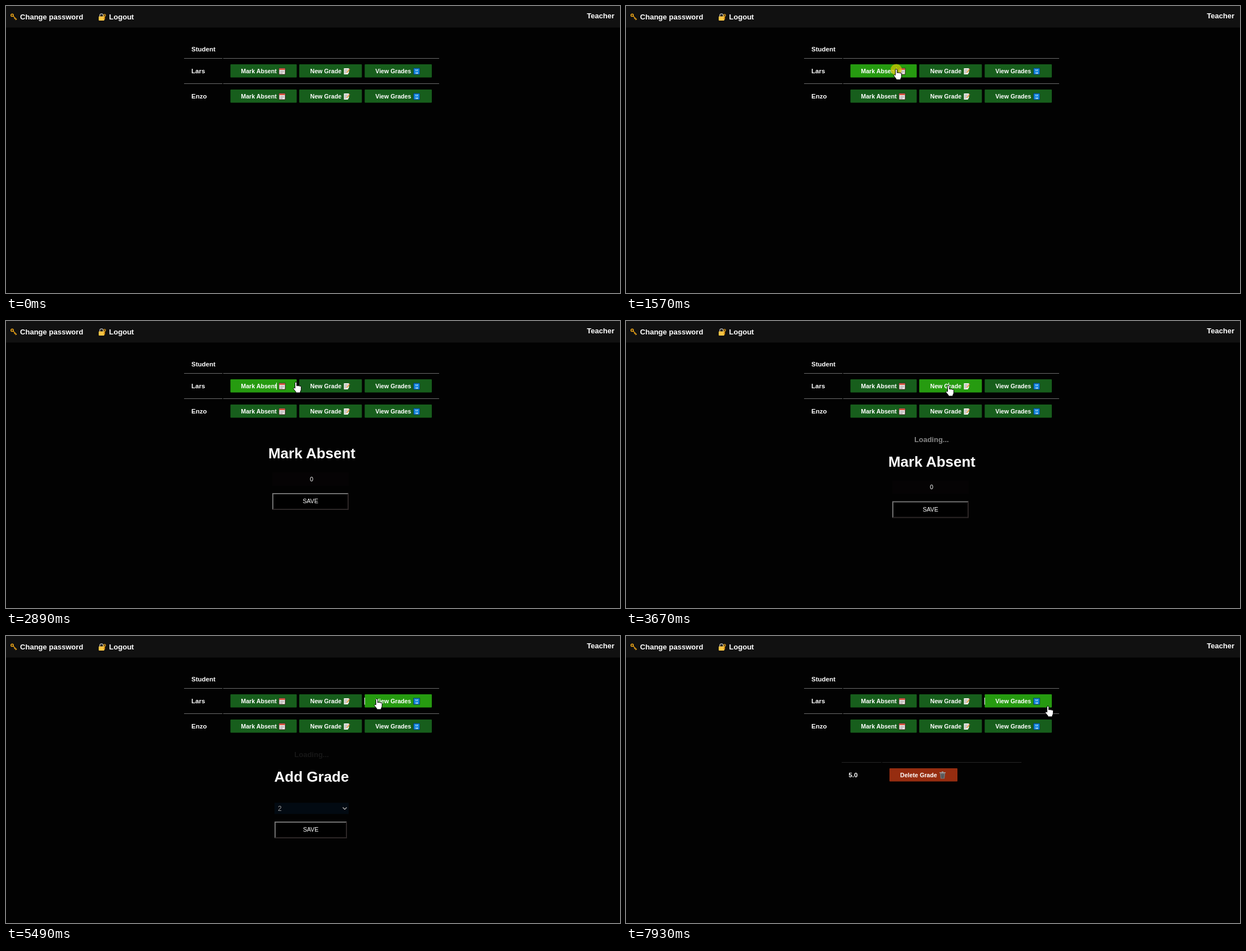
Recreate the animation shown at these times as an HTML page. Size 1093 px wide and 512 px high, loop 8000 ms.

```html
<!DOCTYPE html>
<html lang="en">
<head>
<meta charset="utf-8">
<title>Class register</title>
<style>
html, body { margin: 0; width: 100%; height: 100%; overflow: hidden; background: #020202; }
svg { display: block; }
text { font-family: "Liberation Sans", Arial, sans-serif; font-weight: 700; fill: #fff; }
.plain { font-weight: 400; }
.mid { text-anchor: middle; }
.btn { fill: #175e1c; }
.btn.hover { fill: #269b10; }
</style>
</head>
<body>
<svg id="stage" width="1093" height="512" viewBox="0 0 1093 512">
  <defs>
    <g id="key" fill="none" stroke="#e5a018">
      <circle cx="3" cy="3.4" r="2.1" stroke-width="1.7"/>
      <path d="M4.8 5 11 11.2M8 8.4 6.6 10M10 10.4 8.7 11.8" stroke-width="1.5"/>
    </g>
    <g id="lock">
      <path d="M2 7V4a3 3 0 0 1 6 0V7" fill="none" stroke="#a9a9a9" stroke-width="1.5"/>
      <rect y="5.5" width="10" height="7.5" rx="1" fill="#fbc543"/>
      <path d="M10.5 5V11M10.5 9h-2" stroke="#d58a12" stroke-width="1.4"/>
      <circle cx="10.5" cy="3.5" r="1.7" fill="none" stroke="#e5a018" stroke-width="1.3"/>
    </g>
    <g id="calendar">
      <rect x=".5" y=".5" width="11" height="11" fill="#f4f0ee" stroke="#3a2320"/>
      <path d="M1 2.2H11" stroke="#d8402c" stroke-width="2.4"/>
      <path d="M2.5 5.5H9.5M2.5 7.5H9.5M2.5 9.5H7" stroke="#9a9a9a"/>
    </g>
    <g id="memo">
      <path d="M1 .5H10V8L8 11.5H1z" fill="#f3f1ec"/>
      <path d="M2.5 3H8M2.5 5H7M2.5 7H6M2.5 9H5" stroke="#8d8d8d" stroke-width=".8"/>
      <path d="M11 2.5 6 8.5" stroke="#e39a38" stroke-width="1.7"/>
      <path d="M11.5 1.9 10.6 3" stroke="#d9485a" stroke-width="1.7"/>
    </g>
    <g id="digits">
      <rect x=".5" y=".5" width="11" height="11" fill="#0f83dc" stroke="#0a3a66"/>
      <text x="6" y="5.4" font-size="4.4" class="mid">12</text>
      <text x="6" y="10" font-size="4.4" class="mid">34</text>
    </g>
    <g id="bin">
      <path d="M1.5 3H10.5L9.5 13h-7z" fill="#77797b"/>
      <path d="M4 4.5 4.4 12M6 4.5V12M8 4.5 7.6 12" stroke="#3b3d3f" stroke-width=".9"/>
      <path d="M.5 2.3H11.5M4.5 1H7.5" stroke="#a0a2a4" stroke-width="1.4"/>
    </g>
  </defs>
</svg>
<script>
const LOOP = 8000, BLINK = 530, STEP = 77, PUSH = 14.5;
const stage = document.getElementById('stage');

const text = (x, y, size, str, cls = '', more = '') =>
  `<text x="${x}" y="${y}" font-size="${size}" class="${cls}" ${more}>${str}</text>`;
const rect = (x, y, w, h, fill) => `<rect x="${x}" y="${y}" width="${w}" height="${h}" fill="${fill}"/>`;
const icon = (name, x, y) => `<use href="#${name}" x="${x}" y="${y}"/>`;
const rule = (y, x1, x2, x3, color) => rect(x1, y, x2 - x1, 1, color) + rect(x2 + 1.5, y, x3 - x2 - 1.5, 1, color);

// Column: left edge, width, label, label x, icon, icon x
const columns = [
  [399.5, 118, 'Mark Absent', 418.3, 'calendar', 485.5],
  [522, 111.5, 'New Grade', 541.5, 'memo', 600.5],
  [638.5, 119.5, 'View Grades', 657.5, 'digits', 725]
];
const row = (name, y) => text(330, y + 15.5, 11.5, name) + columns.map(([x, w, label, tx, pic, px]) =>
  `<rect class="btn" x="${x}" y="${y}" width="${w}" height="23.5" rx="1"/>` +
  text(tx, y + 16, 10.65, label) + icon(pic, px, y + 6.5)).join('');

const saveButton = (x, y, w) => {
  const h = 30;
  return rect(x, y, w, h, '#000') +
    `<path d="M${x} ${y + h}V${y}H${x + w}l-2 2H${x + 2}V${y + h - 2}z" fill="#727272"/>` +
    `<path d="M${x} ${y + h}H${x + w}V${y}l-2 2V${y + h - 2}H${x + 2}z" fill="#2d2727"/>` +
    text(x + w / 2, y + 18.3, 10.7, 'SAVE', 'plain mid');
};
const view = (id, body) => `<g id="${id}">${body}</g>`;

stage.insertAdjacentHTML('beforeend',
  rect(0, 0, 1093, 38.5, '#111') +
  icon('key', 8, 13) + text(25, 24, 13.05, 'Change password') +
  icon('lock', 165, 13) + text(183.5, 24, 13.05, 'Logout') +
  text(1083, 21.7, 13, 'Teacher', '', 'text-anchor="end"') +
  text(330, 80.5, 11.5, 'Student') +
  rule(93, 317, 385, 771, '#6c6c6c') + row('Lars', 104) +
  rule(138, 317, 385, 771, '#6c6c6c') + row('Enzo', 149) +
  text(544, 216, 13, 'Loading...', 'mid', 'id="loading"') +
  view('absent',
    text(544.5, 245, 26, 'Mark Absent', 'mid') +
    rect(474, 270, 136, 24, '#050304') + text(544, 285.5, 10.7, '0', 'plain mid') +
    saveButton(474, 307, 136)) +
  view('add',
    text(544, 245, 26, 'Add Grade', 'mid') +
    rect(478, 283, 132, 20, '#020a12') +
    text(484, 297.2, 12, '2', 'plain', 'style="fill:#9b9b9b"') +
    '<path d="M599.5 291.3 603 294.8 606.5 291.3" fill="none" stroke="#a8a8a8" stroke-width="1.5"/>' +
    saveButton(478, 316.5, 129)) +
  view('grades',
    rule(225, 384, 454.5, 704, '#262626') + text(396.3, 251.5, 11.5, '5.0') +
    '<rect x="469" y="236" width="121" height="23.5" rx="1" fill="#962d10"/>' +
    text(488, 252, 10.65, 'Delete Grade') + icon('bin', 557.5, 241.5)) +
  '<rect id="caret" y="110" width="1" height="12.5" fill="#fff"/>' +
  `<g id="pointer" stroke="#000" fill="#fff" stroke-linejoin="round">
    <circle id="click" r="10" fill="#d8c800" fill-opacity=".7" stroke="none"/>
    <path id="hand" d="M-1.5 9V.5a1.5 1.5 0 0 1 3 0V6q0-1 1.3-1t1.4 1.2q0-.9 1.3-.9t1.4 1.3q.2-.6 1.2-.6 1.3 0 1.3 1.5V12q0 2-1.5 4V18H0V16.5L-4 11.5q-1-1.5 .3-2.2 1.2-.5 2.2 .7z"/>
    <path id="arrow" d="M0 0V16L3.7 12.5 6 18 8.3 17 6 11.6H11z"/>
  </g>`);

const $ = id => document.getElementById(id);
const show = (id, on) => $(id).setAttribute('display', on ? 'inline' : 'none');
const buttons = [...document.querySelectorAll('.btn')].map(el => {
  const [x, y, w, h] = ['x', 'y', 'width', 'height'].map(k => +el.getAttribute(k));
  return { el, has: (px, py) => px >= x && px <= x + w && py >= y && py <= y + h };
});

// Pointer stops: time, x, y
const path = [
  [470, 695, 460], [1240, 484, 114], [1330, 481, 114], [1430, 481, 113.5], [2889, 481, 113.5],
  [2890, 516, 110], [3210, 574, 116], [4709, 574, 116], [4710, 573.5, 115], [5180, 658, 113],
  [5410, 658, 113], [5490, 660, 113], [6970, 660, 113], [7060, 660.5, 113], [7680, 660.5, 113],
  [7930, 751, 126], [LOOP, 751, 126]
];
// Clicks: time, caret x, loader start and end
const clicks = [[1570, 481, 1650, 2440], [3370, 574, 3450, 4310], [5330, 638, 5390, 6510]];

function pointerAt(t) {
  const i = path.findIndex(p => p[0] > t);
  const [t0, x0, y0] = path[i - 1], [t1, x1, y1] = path[i];
  const p = Math.floor((t - t0) / STEP) * STEP / (t1 - t0), e = p * (2 - p);
  return [x0 + (x1 - x0) * e, y0 + (y1 - y0) * e];
}

function draw(t) {
  const moving = t >= path[0][0];
  const [x, y] = moving ? pointerAt(t) : [-99, -99];
  let over = false;
  for (const b of buttons) {
    const hit = b.has(x, y);
    b.el.classList.toggle('hover', hit);
    over = over || hit;
  }
  show('pointer', moving);
  show('hand', over);
  show('arrow', !over);
  $('pointer').setAttribute('transform', `translate(${x} ${y})`);

  const [at, caretX, from, to] = clicks.filter(c => c[0] <= t).pop() || [LOOP, 0, LOOP, LOOP];
  const since = t - at;
  show('click', since >= 0 && since < 160);
  show('caret', since >= 0 && Math.floor(since / BLINK) % 2 === 0);
  $('caret').setAttribute('x', caretX);

  const busy = t >= from && t < to;
  $('loading').setAttribute('opacity', busy ? Math.sin(Math.PI * (t - from) / (to - from)) ** 2 : 0);
  const current = t < 2110 ? '' : t < 3940 ? 'absent' : t < 7290 ? 'add' : 'grades';
  for (const id of ['absent', 'add', 'grades']) {
    show(id, id === current);
    $(id).setAttribute('transform', `translate(0 ${busy ? PUSH : 0})`);
  }
}

const start = performance.now();
function tick() {
  draw((performance.now() - start) % LOOP);
  requestAnimationFrame(tick);
}
tick();
</script>
</body>
</html>
```
